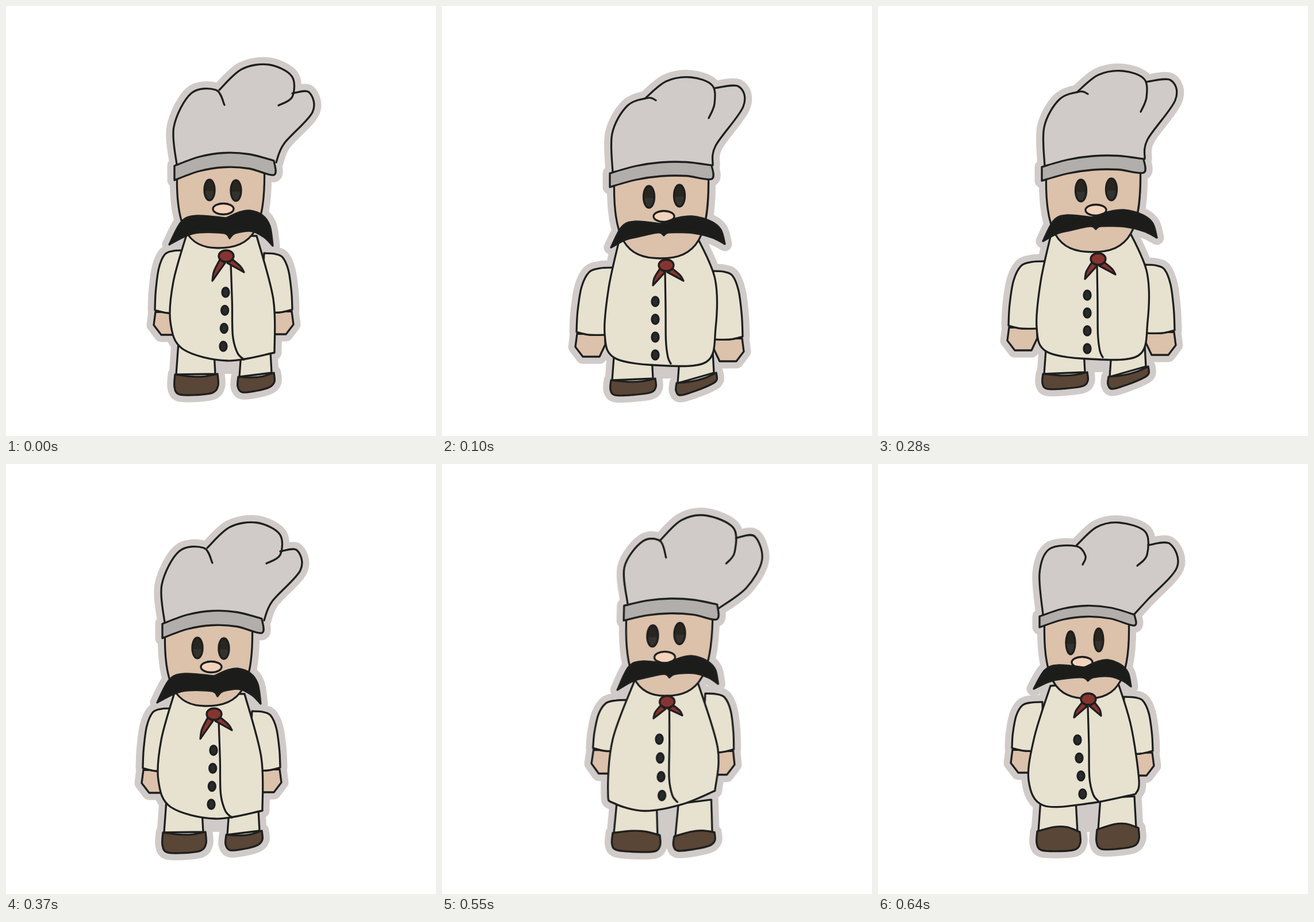
Animation, 748 px wide and 748 px high, one loop 0.73 s. Source, as an HTML page:

```html
<!DOCTYPE html>
<html lang="en">
<head>
<meta charset="utf-8">
<title>Dancing chef</title>
<style>
html, body { margin: 0; width: 100%; height: 100%; overflow: hidden; background: #fff; }
svg { display: block; width: 100vw; height: 100vh; }
path, ellipse { stroke-linejoin: round; stroke-linecap: round; }
.ink { stroke: #1d1f1e; stroke-width: 3.3; }
</style>
</head>
<body>
<svg id="stage" viewBox="0 0 748 748">
  <defs>
    <linearGradient id="eye" x2="0" y2="1">
      <stop offset=".55" stop-color="#29251f"/>
      <stop offset=".55" stop-color="#34322f"/>
    </linearGradient>
  </defs>
</svg>
<script>
const HALO = '#d0cbc8', SKIN = '#dcc1ab', CREAM = '#e7e1d0', BROWN = '#5a4636', RED = '#863430', INK = '#1c1c1b';

// Key points of the rig, as x y pairs; "|" marks a sharp corner.
// feet: left top, right top, then the shoe height; puff: bulge of the shoe tops.
const POSES = {
  lean: {
    hat: ['297 276 292 210 322 152 365 146 380 172', '371 146 410 110 457 102 497 122 498 158 474 173', '498 152 527 150 533 185 484 239 470 272'],
    band: '293 278 466 269', arch: 18, brim: 25,
    jaw: '298 368 449', chin: 421,
    eyes: '354 320 400 321', eye: [10, 19], nose: '378 353',
    tache: '284 415 391 368 464 417', thick: 36,
    coat: '314 398 291 480 286 550 308 597 385 617 467 603|465 510 436 400',
    front: '391 447 414 615', buttons: '382 498 378 592',
    tie: '359 478 383 435 414 463',
    arms: ['308 425 259 529', '449 430 498 528'],
    feet: ['294 641 368 640', '404 645 466 638'], shoe: [36, 28], puff: 4
  },
  wide: {
    hat: ['297 290 296 222 322 174 358 160 372 164', '353 161 390 131 433 124 470 138 474 170 464 195', '474 143 516 140 524 175 476 243 471 277'],
    band: '292 291 469 277', arch: 12, brim: 24,
    jaw: '300 379 463', chin: 439,
    eyes: '360 332 413 330', eye: [10.5, 20], nose: '386 366',
    tache: '294 420 388 378 492 414', thick: 21,
    coat: '308 408 290 490 283 570 300 612 375 625 460 619 476 560 475 475 444 402',
    front: '388 462 398 622', buttons: '371 514 371 607',
    tie: '367 486 390 451 420 478',
    arms: ['297 455 234 567', '472 461 523 575'],
    feet: ['294 651 371 648', '408 656 477 638'], shoe: [27, 22], puff: 4
  },
  tall: {
    hat: ['312 256 305 195 335 152 366 151 377 179', '366 150 402 116 445 108 493 129 496 170 482 189', '498 146 530 143 544 183 518 230 470 265'],
    band: '306 260 468 258', arch: 11, brim: 25,
    jaw: '311 382 460', chin: 412,
    eyes: '357 311 404 307', eye: [10.5, 19], nose: '379 347',
    tache: '298 402 390 357 473 392', thick: 24,
    coat: '328 385 292 485 286 575 297 593 350 606 415 595 472 572|475 500 437 388',
    front: '389 428 407 591', buttons: '373 485 380 580',
    tie: '362 450 385 422 412 445',
    arms: ['316 419 258 500', '451 408 503 502'],
    feet: ['296 643 378 647', '403 649 473 642'], shoe: [30, 25], puff: -5
  },
  slim: {
    hat: ['287 262 281 190 298 148 345 143 361 160 356 175', '345 142 380 110 420 102 465 118 468 158 451 177', '470 141 508 139 520 180 470 235 445 262'],
    band: '281 265 446 262', arch: 17, brim: 19,
    jaw: '290 364 436', chin: 408,
    eyes: '335 311 384 306', eye: [9, 21], nose: '355 345',
    tache: '271 391 367 353 440 387', thick: 24,
    coat: '300 386 272 475 262 550 288 594 370 590 448 574|454 550 440 455 416 376',
    front: '365 422 384 587', buttons: '347 480 356 574',
    tie: '341 441 366 409 388 438',
    arms: ['286 414 233 494', '428 405 478 499'],
    feet: ['277 639 351 640', '381 636 453 633'], shoe: [34, 35], puff: -8
  }
};

// The squash and the stretch are deformed about the feet.
const STEPS = [
  { pose: 'lean', ms: 100 },
  { pose: 'wide' },
  { pose: 'wide', x: -3, y: -2, sx: 1.04, sy: .97 },
  { pose: 'wide', x: -7, y: -11 },
  { pose: 'lean', x: -21 },
  { pose: 'tall' },
  { pose: 'tall', sy: 1.032, skew: -1.4 },
  { pose: 'slim' }
];
const FEET = [382, 684];

const stage = document.getElementById('stage');

function add(parent, tag, attrs) {
  const el = document.createElementNS('http://www.w3.org/2000/svg', tag);
  for (const k in attrs) el.setAttribute(k, attrs[k]);
  return parent.appendChild(el);
}

const nums = text => text.split(' ').map(Number);
const pairs = text => nums(text).flatMap((v, i, n) => i % 2 ? [] : [[v, n[i + 1]]]);
const runs = text => text.split('|').map(pairs);
const mix = (a, b, u, v = u) => [a[0] + (b[0] - a[0]) * u, a[1] + (b[1] - a[1]) * v];
const shift = (p, x, y) => [p[0] + x, p[1] + y];
const polygon = points => 'M' + points.join('L') + 'Z';

// Catmull-Rom spline through each run of points; runs meet in corners
function curve(...parts) {
  let d = 'M' + parts[0][0], last = null;
  for (const part of parts) {
    const p = last ? [last, ...part] : part;
    for (let i = 0; i < p.length - 1; i++) {
      const a = p[i - 1] || p[i], b = p[i], c = p[i + 1], e = p[i + 2] || c;
      const c1 = b.map((v, k) => v + (c[k] - a[k]) / 6);
      const c2 = c.map((v, k) => v - (e[k] - b[k]) / 6);
      d += `C${c1} ${c2} ${c}`;
    }
    last = p[p.length - 1];
  }
  return d;
}

function band(p) {
  const [l, r] = pairs(p.band);
  const edge = drop => [0, .25, .5, .75, 1].map(u => shift(mix(l, r, u), 0, drop - p.arch * 4 * u * (1 - u)));
  return curve(edge(0), edge(p.brim).reverse(), [l]) + 'Z';
}

function face(p) {
  const [xl, xc, xr] = nums(p.jaw), [l, r] = pairs(p.band), y = p.chin;
  const cheek = l[1] + (y - l[1]) * .78;
  return `M${xl} ${l[1]}C${xl - 5} ${cheek} ${xl + 20} ${y} ${xc} ${y}` +
    `C${xr - 20} ${y} ${xr + 5} ${cheek} ${xr} ${r[1]}Z`;
}

function tache(p) {
  const [l, m, r] = pairs(p.tache), t = p.thick;
  const toL = (u, v) => mix(l, m, u, 1 - v), toR = (u, v, up = 0) => shift(mix(m, r, u, v), 0, -up);
  return curve(
    [l, toL(.2, .15), shift(toL(.45, 0), 0, -3), shift(m, -8, 1)],
    [toR(.2, 0, 9), toR(.45, 0, 12), toR(.75, 0, 4), toR(.93, .3), r],
    [toR(.8, .7), toR(.5, .48), shift(m, 8, t * .75), shift(m, -2, t)],
    [shift(m, -12, t * .75), toL(.5, .55), toL(.27, .68), l]
  ) + 'Z';
}

function front(p) {
  const [a, b] = pairs(p.front);
  return curve([a, mix(a, b, .1, .4), mix(a, b, .15, .75), mix(a, b, .5, .93), b]);
}

function tail(tip, knot, side) {
  const a = shift(knot, 11 * side, 6), b = shift(knot, 2 * side, 12);
  return curve([a, shift(mix(a, tip, .55), 3 * side, 0), tip], [mix(b, tip, .6), b]) + 'Z';
}

function sleeve(arm, side) {
  const [s, c] = pairs(arm);
  return curve(
    [s, mix(s, c, .35, .01), mix(s, c, .65, .07), mix(s, c, .86, .3), mix(s, c, .97, .68), c],
    [shift(c, -22 * side, 5), shift(c, -55 * side, 5)]
  ) + 'Z';
}

function hand(arm, side) {
  const c = pairs(arm)[1];
  const at = (inward, down) => shift(c, -inward * side, down);
  return polygon([at(1, 3), at(-2, 26), at(11, 43), at(40, 43), at(50, 22), at(50, 4)]);
}

function leg(foot) {
  const [a, b] = pairs(foot);
  return polygon([shift(a, 2, 0), shift(a, 6, -55), shift(b, -7, -55), shift(b, -4, 0)]);
}

function shoe(foot, h, puff) {
  const [a, b] = pairs(foot);
  return curve(
    [a, shift(mix(a, b, .4), 0, puff), shift(mix(a, b, .7), 0, puff), b],
    [shift(b, 1, h * .55), shift(b, -8, h * .9), shift(mix(a, b, .5), 0, h), shift(a, 7, h * .96), shift(a, -1, h * .6), a]
  ) + 'Z';
}

function ellipse(g, [cx, cy], rx, ry, fill) {
  add(g, 'ellipse', { cx, cy, rx, ry, fill, class: 'ink' });
}

function drawChef(g, p) {
  const sides = [-1, 1];
  const lobes = p.hat.map(t => curve(pairs(t)));
  const hat = lobes.join('').replace(/(?!^)M/g, 'L') + 'Z';
  const feet = p.feet.map(pairs);
  const under = [
    ...p.feet.map(f => [leg(f), CREAM]),
    ...p.feet.map((f, i) => [shoe(f, p.shoe[i], p.puff), BROWN]),
    ...p.arms.map((a, i) => [hand(a, sides[i]), SKIN]),
    ...p.arms.map((a, i) => [sleeve(a, sides[i]), CREAM]),
    [curve(...runs(p.coat)) + 'Z', CREAM]
  ];
  const head = [[face(p), SKIN], [band(p), '#b1aeab'], [tache(p), INK]];
  const ink = (d, fill) => add(g, 'path', { d, fill, class: 'ink' });

  const halo = add(g, 'g', { fill: HALO, stroke: HALO, 'stroke-width': 25 });
  const [x, y] = feet[0][1];
  add(halo, 'path', { d: polygon([[x, y - 45], [feet[1][0][0], y - 45], [feet[1][0][0], y], [x, y]]), 'stroke-width': 0 });
  [...under, ...head, [hat]].forEach(([d]) => add(halo, 'path', { d }));

  under.forEach(([d, fill]) => ink(d, fill));
  ink(front(p), 'none');
  const [first, last] = pairs(p.buttons);
  for (let i = 0; i < 4; i++) ellipse(g, mix(first, last, i / 3), 6, 8, '#2a2a2c');

  ink(...head[0]);
  const [tipL, knot, tipR] = pairs(p.tie);
  ink(tail(tipL, knot, -1), RED);
  ink(tail(tipR, knot, 1), RED);
  ellipse(g, knot, 13, 10, RED);

  add(g, 'path', { d: hat, fill: HALO });
  lobes.forEach(d => ink(d, 'none'));
  ink(...head[1]);
  pairs(p.eyes).forEach(c => ellipse(g, c, p.eye[0] - 1, p.eye[1] - 1, 'url(#eye)'));
  ellipse(g, pairs(p.nose)[0], 18, 9.5, '#f3d3bb');
  ink(...head[2]);
}

const frames = STEPS.map(s => ({ x: 0, y: 0, sx: 1, sy: 1, skew: 0, ms: 90, ...s }));
const total = frames.reduce((sum, s) => sum + s.ms, 0);
const easing = 'step-end';
let at = 0;
for (const s of frames) {
  const [fx, fy] = FEET;
  const transform = `translate(${fx + s.x} ${fy + s.y}) skewX(${s.skew}) scale(${s.sx} ${s.sy}) translate(${-fx} ${-fy})`;
  const g = add(stage, 'g', { transform, opacity: 0 });
  drawChef(g, POSES[s.pose]);
  const from = at / total, to = (at + s.ms) / total;
  const keys = [{ opacity: 1, offset: from, easing }];
  if (from > 0) keys.unshift({ opacity: 0, offset: 0, easing });
  if (to < 1) keys.push({ opacity: 0, offset: to, easing });
  keys.push({ opacity: to < 1 ? 0 : 1, offset: 1 });
  g.animate(keys, { duration: total, iterations: Infinity });
  at += s.ms;
}
</script>
</body>
</html>
```
